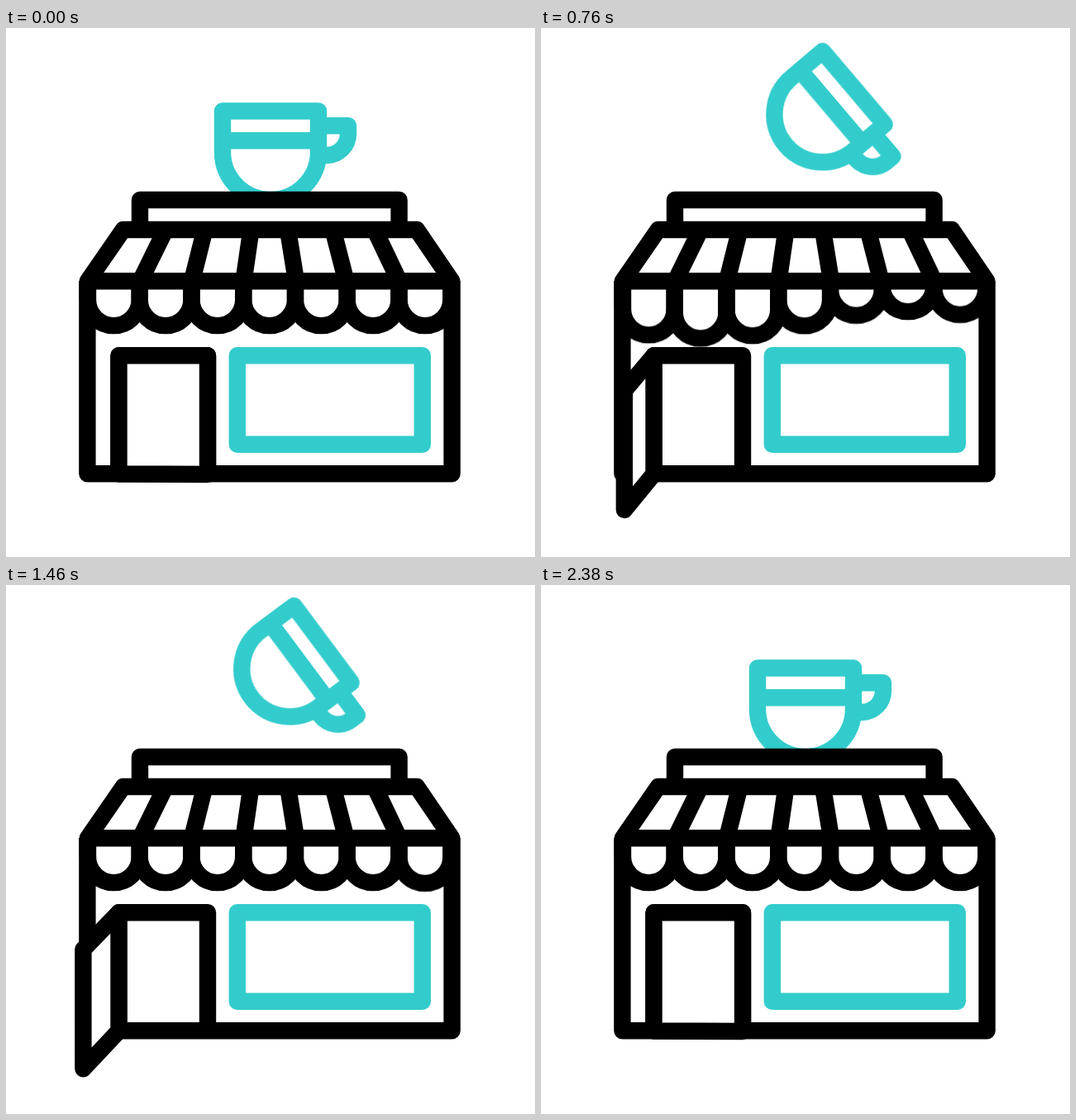
Write an HTML page that moves like this. It is 640 px wide and 640 px high and loops after 2400 ms.

```html
<!DOCTYPE html>
<html lang="en">
<head>
<meta charset="utf-8">
<title>Coffee shop</title>
<style>
  html, body { margin: 0; width: 100%; height: 100%; overflow: hidden; background: #fff; }
  svg { display: block; width: 100%; height: 100%; }

  .line { fill: none; stroke: #000; stroke-width: 20.4; stroke-linejoin: round; }
  .teal { stroke: #3cc; }
  .solid { fill: #fff; }

  .cup {
    transform-origin: 365px 129.3px;
    animation: tip 2400ms infinite cubic-bezier(.8, 0, .2, 1);
  }
  @keyframes tip {
    0%, .8% { transform: translate(0, 0) rotate(0deg); }
    47.3%, 49.7% { transform: translate(22.7px, -4.5px) rotate(55.5deg); }
    97.9%, 100% { transform: translate(0, 0) rotate(0deg); }
  }

  .door { animation: swing 2400ms infinite; }
  @keyframes swing {
    0% {
      d: path("M136.5 396.3L244 396.3L244 540L136.5 539.5Z");
      animation-timing-function: cubic-bezier(.75, 0, .25, 1);
    }
    47.9% {
      d: path("M136.5 396.3L81 444.5L81 589L136.5 539.5Z");
      animation-timing-function: cubic-bezier(.77, 0, .23, 1);
    }
    92.5%, 100% { d: path("M136.5 396.3L244 396.3L244 540L136.5 539.5Z"); }
  }

  .flap {
    animation: wave 2400ms infinite cubic-bezier(.37, 0, .63, 1);
    animation-delay: calc(var(--i) * 90ms);
  }
  @keyframes wave {
    0% { transform: translateY(0); }
    13.3% { transform: translateY(-17px); }
    27.1% { transform: translateY(15.5px); }
    40.2%, 100% { transform: translateY(0); }
  }
</style>
</head>
<body>
<svg viewBox="0 0 640 640">
  <defs>
    <clipPath id="below"><rect y="306" width="640" height="120"/></clipPath>
    <path id="flap" d="M0 285V328.8A31.35 31.35 0 0 0 62.7 328.8V285"/>
  </defs>

  <g class="cup line teal">
    <path d="M262 100.5H378V150A58 58 0 0 1 262 150ZM262 136.3H378"/>
    <path d="M378 118.3H414V128A26 26 0 0 1 388 154H381"/>
  </g>

  <path class="line solid" d="M162 244V208H475.6V244"/>
  <path class="line" d="M98.4 306V539.3H539.6V306"/>

  <g class="line" clip-path="url(#below)">
    <g class="flap" style="--i:0"><use href="#flap" x="99"/></g>
    <g class="flap" style="--i:1"><use href="#flap" x="161.7"/></g>
    <g class="flap" style="--i:2"><use href="#flap" x="224.5"/></g>
    <g class="flap" style="--i:3"><use href="#flap" x="287.3"/></g>
    <g class="flap" style="--i:4"><use href="#flap" x="350"/></g>
    <g class="flap" style="--i:5"><use href="#flap" x="412.7"/></g>
    <g class="flap" style="--i:6"><use href="#flap" x="475.6"/></g>
  </g>

  <path class="line solid" d="M98.8 306.3L141.8 244H497L539.4 306.3Z"/>
  <path class="line" d="M193 244L162.5 306M240.5 244L225 306M296.5 244L287.5 306M341 244L351 306M395.5 244L411.5 306M446 244L475.5 306"/>

  <path class="line teal" d="M279.8 396.3H503.8V503.8H279.8Z"/>
  <path class="line" d="M136.5 539.3V396.3H244V539.3"/>
  <path class="door line solid" d="M136.5 396.3L244 396.3L244 540L136.5 539.5Z"/>
</svg>
</body>
</html>
```
